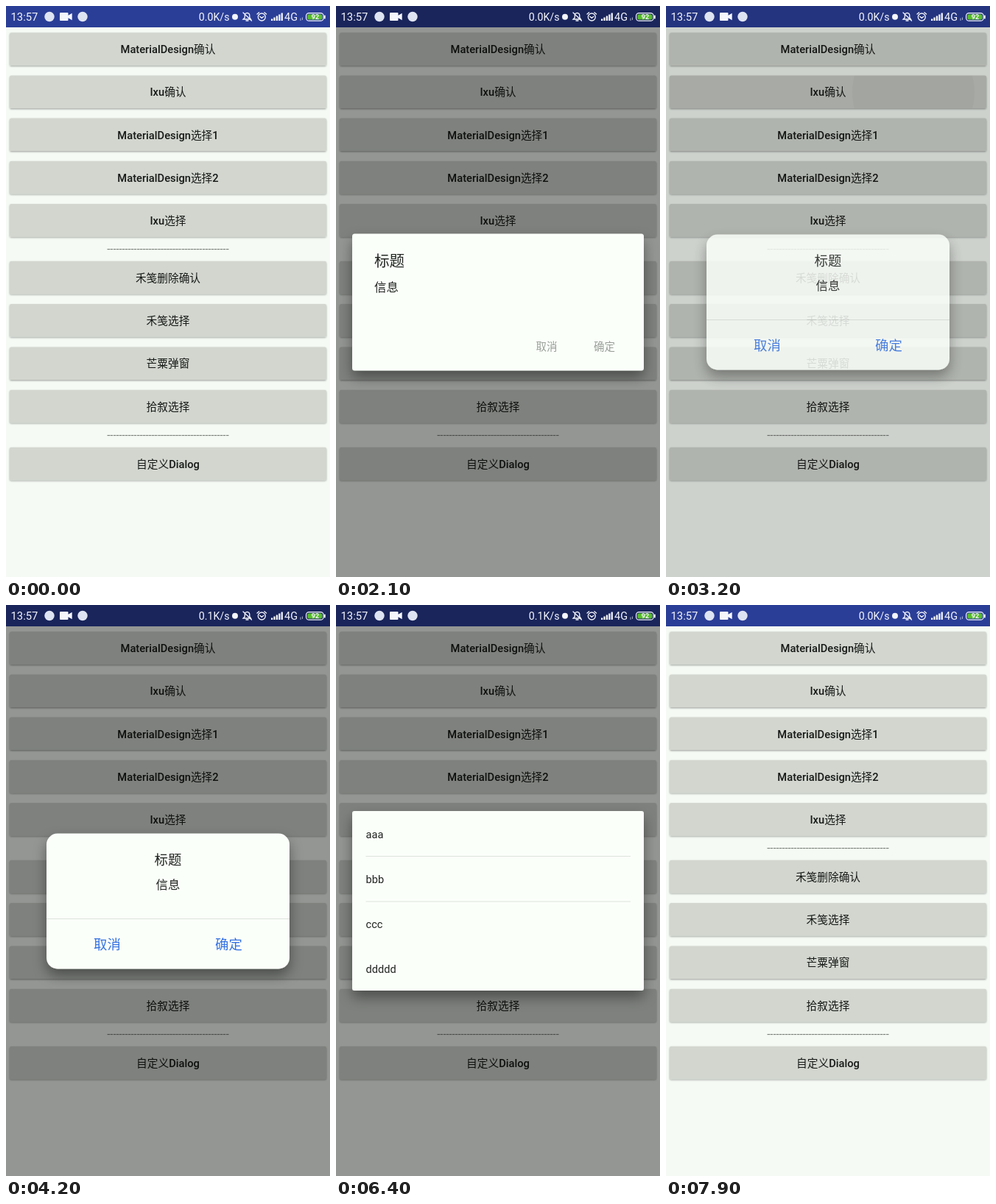
Animation of 440 by 776 pixels, one loop 8 s. Source, as an HTML page:

```html
<!DOCTYPE html>
<html lang="zh">
<head>
<meta charset="utf-8">
<style>
  html, body { margin: 0; width: 100%; height: 100%; overflow: hidden; background: #f5faf4; }
  svg { display: block; width: 440px; height: 776px; }
  text { font-family: Roboto, "Noto Sans CJK SC", "Noto Sans CJK", sans-serif; }
  .latin { font-weight: 500; }
  .mid { text-anchor: middle; }
</style>
</head>
<body>
<svg id="stage" viewBox="0 0 440 776">
  <defs>
    <filter id="low" x="-5%" y="-20%" width="110%" height="150%">
      <feDropShadow dx="0" dy="1.2" stdDeviation="0.9" flood-opacity="0.35"/>
    </filter>
    <filter id="high" x="-20%" y="-20%" width="140%" height="150%">
      <feDropShadow dx="0" dy="9" stdDeviation="9" flood-opacity="0.4"/>
    </filter>
    <clipPath id="pressClip"><rect id="pressArea" x="5" width="430" height="44.5" rx="2"/></clipPath>
  </defs>
  <rect width="440" height="776" fill="#f5faf4"/>
  <rect width="440" height="29" fill="#2b3e97"/>
  <g id="buttons" filter="url(#low)" fill="#d2d6cf"></g>
  <g id="press" clip-path="url(#pressClip)">
    <rect id="highlight" width="440" height="776" fill-opacity="0.055"/>
    <circle id="ripple" fill-opacity="0.055"/>
  </g>
  <g id="labels" class="mid" font-size="14.7" fill="#161916"></g>
  <rect id="dim" width="440" height="776"/>

  <g id="status" fill="#f4f6fc">
    <text x="6.5" y="20" font-size="14.8">13:57</text>
    <circle cx="59" cy="14.5" r="6.7" fill="#dfe4f2"/>
    <circle cx="104" cy="14.5" r="6.7" fill="#dfe4f2"/>
    <path d="M74 9h9.5q1 0 1 1v2.7l5.2-3v9.6l-5.2-3v2.7q0 1-1 1H74q-1 0-1-1v-9q0-1 1-1z"/>
    <text id="speed" x="303.5" y="20" font-size="14.2" text-anchor="end"></text>
    <circle cx="311" cy="14.7" r="4"/>
    <g fill="none" stroke="#f4f6fc" stroke-width="1.3" stroke-linecap="round">
      <path d="M322 18h10.5l-1.7-2.3v-3q0-3-3.2-3.4q-3.3.4-3.3 3.4v3zM326 20h3M322 9l11.5 11"/>
      <circle cx="347.3" cy="15" r="5"/>
      <path d="M341 11l2.7-2.3M353.6 11l-2.7-2.3M344.8 14.3l2.5 2 2.6-2"/>
    </g>
    <g id="signal"></g>
    <text x="378" y="20" font-size="14.5">4G</text>
    <path d="M399.5 16.5h1v3.5h-1zM402 15.5h1v3.5h-1z" opacity="0.65"/>
    <rect x="407.6" y="9.6" width="23.6" height="10.6" rx="4" fill="none" stroke="#f4f6fc" stroke-width="1.2"/>
    <rect x="409.3" y="11.2" width="20.2" height="7.4" rx="2.5" fill="#57bd2c"/>
    <rect x="432" y="12.5" width="1.8" height="5" rx="0.8"/>
    <text class="mid" x="420" y="18.3" font-size="9" font-weight="700">92</text>
  </g>

  <g id="confirm">
    <rect x="22" y="309.5" width="396" height="186" rx="3.5" fill="#fbfffa" filter="url(#high)"/>
    <g fill="#222522">
      <text x="52" y="354" font-size="20.6">标题</text>
      <text x="52" y="387.5" font-size="16.4">信息</text>
    </g>
    <g fill="#9a9e99" font-size="14.5">
      <text x="271.5" y="468">取消</text>
      <text x="350" y="468">确定</text>
    </g>
  </g>

  <g id="rounded" class="mid">
    <rect x="55" y="310.5" width="330" height="184" rx="15" fill="#fbfffa" filter="url(#high)"/>
    <g fill="#222522">
      <text x="220" y="353" font-size="18.4">标题</text>
      <text x="220" y="386" font-size="16.4">信息</text>
    </g>
    <path d="M55 426.5h330" stroke="#dfe3de"/>
    <g fill="#3471e2" font-size="18.4">
      <text x="137.5" y="468">取消</text>
      <text x="302.5" y="468">确定</text>
    </g>
  </g>

  <g id="list">
    <rect x="22" y="280" width="396" height="244" rx="3" fill="#fbfffa" filter="url(#high)"/>
    <path d="M40.5 341.5h359.5M40.5 403h359.5" stroke="#dfe3de"/>
    <g id="items" font-size="14.6" fill="#222522"></g>
  </g>
</svg>
<script>
(() => {
  const LOOP = 8000, STEP = 100, FADE = 220, LEAD = 250;
  const $ = id => document.getElementById(id);
  const clamp = v => Math.max(0, Math.min(1, v));

  function add(parent, name, attrs, text) {
    const el = document.createElementNS("http://www.w3.org/2000/svg", name);
    for (const key in attrs) el.setAttribute(key, attrs[key]);
    if (text) el.textContent = text;
    parent.appendChild(el);
    return el;
  }
  const set = (id, attrs) => {
    for (const key in attrs) $(id).setAttribute(key, attrs[key]);
  };

  const upper = ["MaterialDesign确认", "Ixu确认", "MaterialDesign选择1", "MaterialDesign选择2", "Ixu选择"];
  const lower = ["禾笺删除确认", "禾笺选择", "芒粟弹窗", "拾叙选择"];
  const buttonTop = center => center - 22.8;

  function addButton(label, center) {
    add($("buttons"), "rect", { x: 5, y: buttonTop(center), width: 430, height: 44.5, rx: 2 });
    const text = add($("labels"), "text", { x: 220, y: center + 5.2 });
    for (const run of label.match(/[\x20-\x7e]+|[^\x20-\x7e]+/g))
      add(text, "tspan", run < "\x7f" ? { class: "latin" } : {}, run);
  }
  upper.forEach((label, i) => addButton(label, 59 + 58.2 * i));
  lower.forEach((label, i) => addButton(label, 369.6 + 58.3 * i));
  addButton("自定义Dialog", 622.6);
  for (const y of [335.3, 588.3])
    add($("labels"), "text", { x: 220, y, "font-size": 14.6, fill: "#7b7f7a" }, "-".repeat(41));

  ["aaa", "bbb", "ccc", "ddddd"].forEach((item, i) =>
    add($("items"), "text", { x: 40.5, y: 316.6 + 61.2 * i }, item));
  for (let i = 0; i < 5; i++)
    add($("signal"), "rect", { x: 360 + 3.4 * i, y: 17.5 - 2 * i, width: 2.3, height: 2.5 + 2 * i });

  const dialogs = [
    { id: "confirm", open: 1350, close: 2550, button: 59, touch: 334 },
    { id: "rounded", open: 3112, close: 4450, button: 117.2, touch: 336 },
    { id: "list", open: 5260, close: 6600, button: 175.4, touch: 331 }
  ];

  function drawPress(d, t) {
    const since = t - d.open, age = Math.max(0, since + LEAD);
    set("pressArea", { y: buttonTop(d.button) });
    set("highlight", { opacity: clamp(age / 80) * (1 - clamp((since - 100) / 300)) });
    set("ripple", {
      cx: d.touch, cy: d.button,
      r: 110 * (1 - Math.exp(-age / 240)),
      opacity: 1 - clamp(since / 150)
    });
  }

  function draw(t) {
    let dim = 0;
    for (const d of dialogs) {
      const enter = clamp((t - d.open) / FADE), leave = clamp((t - d.close) / FADE);
      const alpha = (1 - (1 - enter) ** 3.7) * (1 - leave) ** 2;
      dim += 0.4 * enter * (1 - leave);
      set(d.id, { opacity: alpha, display: alpha > 0 ? "inline" : "none" });
    }
    set("dim", { opacity: dim });
    drawPress(dialogs.filter(d => t >= d.open - LEAD).pop() || dialogs[0], t);
    $("speed").textContent = t >= 3700 && t < 7100 ? "0.1K/s" : "0.0K/s";
  }

  const start = performance.now();
  function tick() {
    const t = (performance.now() - start) % LOOP;
    draw(Math.floor(t / STEP) * STEP);
    requestAnimationFrame(tick);
  }
  tick();
})();
</script>
</body>
</html>
```
